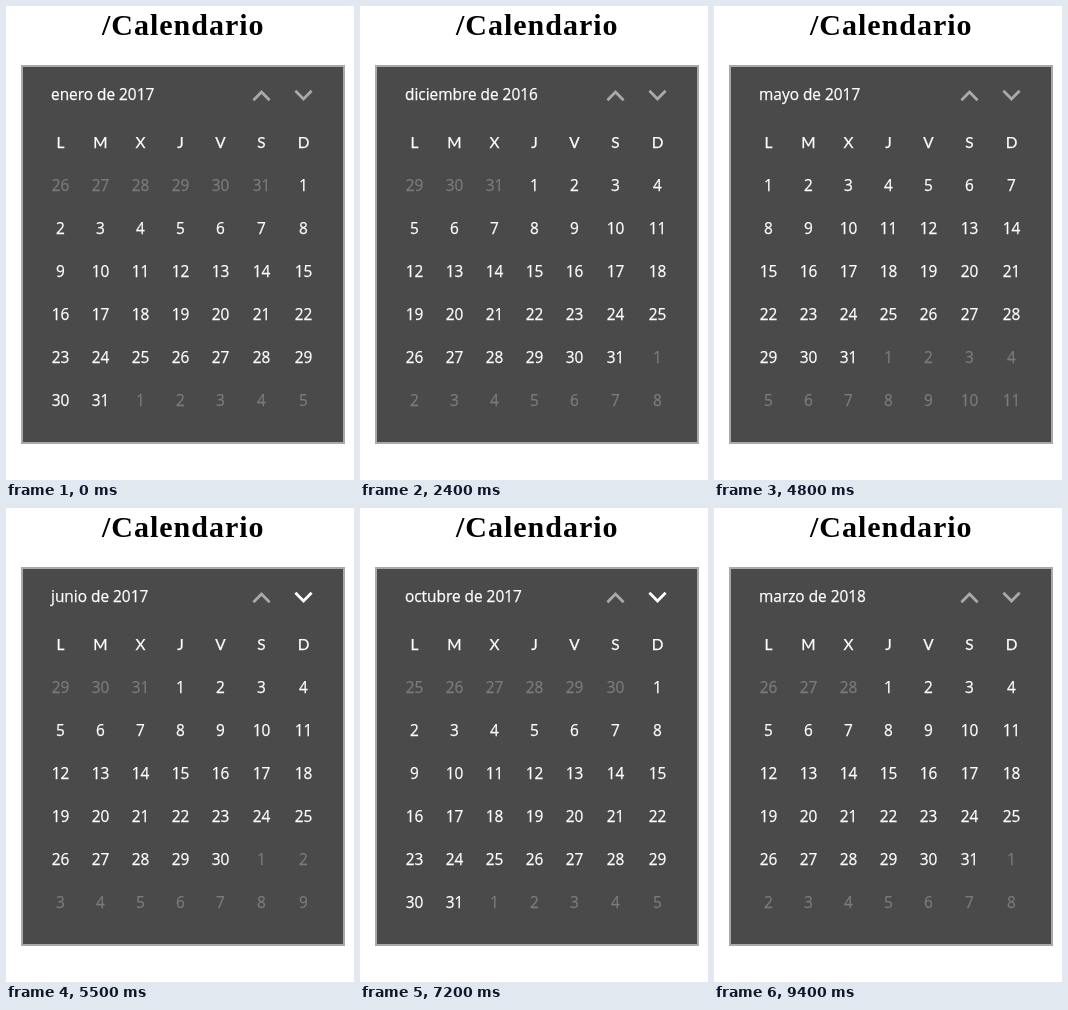
These frames come from a looping animation (348 px wide and 474 px high, 9.9 s). An HTML page:

```html
<!DOCTYPE html>
<html lang="es">
<head>
<meta charset="utf-8">
<title>Calendario</title>
<style>
  html, body { margin: 0; width: 100%; height: 100%; overflow: hidden; background: #fff; }
  svg { display: block; width: 348px; height: 474px; }
  .heading { font: bold 30px "Liberation Serif", "Times New Roman", serif; letter-spacing: 1px; }
  .panel { fill: #4a4a4a; stroke: #a9a9a9; stroke-width: 2; }
  .label { font: 15.4px "Open Sans", "Noto Sans", sans-serif; color: #fff;
    fill: currentColor; stroke: currentColor; stroke-width: .25; }
  .day { font-family: Lato, sans-serif; }
  .mid { text-anchor: middle; }
  .dim { color: #7b7b7b; }
  .arrow { fill: none; stroke: #a9a9a9; stroke-width: 2.8; }
  .arrow.hot { stroke: #fff; }
</style>
</head>
<body>
<svg viewBox="0 0 348 474">
  <text class="heading mid" x="177.3" y="29">/Calendario</text>
  <rect class="panel" x="16" y="60" width="322" height="377"/>
  <text class="label" id="month" x="45" y="94"></text>
  <path class="arrow" id="up" d="M247.4 94.2 L255.5 86.1 L263.6 94.2"/>
  <path class="arrow" id="down" d="M289.4 84.8 L297.5 92.9 L305.6 84.8"/>
  <g id="grid"></g>
</svg>
<script>
const LOOP = 9900;
const COLS = [54.5, 94.5, 134.5, 174.5, 214.5, 255.5, 297.5];
const MONTHS = ['enero', 'febrero', 'marzo', 'abril', 'mayo', 'junio', 'julio',
  'agosto', 'septiembre', 'octubre', 'noviembre', 'diciembre'];

// [start ms, months from January 2017, hovered arrow]
const STEPS = [
  [0, 0], [400, 0, 'up'], [1200, -1], [1700, -1, 'up'], [1900, -2],
  [2100, -2, 'down'], [2400, -1], [2600, -1, 'down'], [2900, 0],
  [3100, 0, 'down'], [3300, 1], [3500, 1, 'down'], [3700, 2],
  [4000, 2, 'down'], [4200, 3], [4600, 3, 'down'], [4800, 4],
  [5100, 4, 'down'], [5200, 5], [5500, 5, 'down'], [5700, 6],
  [6000, 6, 'down'], [6100, 7, 'down'], [6200, 7],
  [6500, 7, 'down'], [6600, 8, 'down'], [6700, 8], [6900, 8, 'down'],
  [7000, 9], [7200, 9, 'down'], [7400, 10], [7500, 10, 'down'], [7800, 11],
  [8300, 11, 'down'], [8500, 12], [8700, 12, 'down'], [8900, 13],
  [9100, 13, 'down'], [9300, 14, 'down'], [9400, 14]
];

const byId = id => document.getElementById(id);
const title = byId('month'), grid = byId('grid');
const arrows = [byId('up'), byId('down')];

function addCell(col, y, type = '') {
  const cell = document.createElementNS('http://www.w3.org/2000/svg', 'text');
  cell.setAttribute('class', `label mid ${type}`);
  cell.setAttribute('x', COLS[col]);
  cell.setAttribute('y', y);
  return grid.appendChild(cell);
}

[...'LMXJVSD'].forEach((day, col) => {
  addCell(col, 142, 'day').textContent = day;
});
const cells = Array.from({ length: 42 }, (_, i) =>
  addCell(i % 7, 185 + 43 * Math.floor(i / 7)));

const daysIn = (year, month) => new Date(year, month + 1, 0).getDate();

function showMonth(offset) {
  const first = new Date(2017, offset, 1);
  const year = first.getFullYear(), month = first.getMonth();
  const lead = (first.getDay() + 6) % 7;
  const days = daysIn(year, month);
  // The calendar counts 31 days before December.
  const before = month === 11 ? 31 : daysIn(year, month - 1);
  title.textContent = `${MONTHS[month]} de ${year}`;
  cells.forEach((cell, i) => {
    const n = i - lead + 1;
    cell.textContent = n < 1 ? before + n : n > days ? n - days : n;
    cell.classList.toggle('dim', n < 1 || n > days);
  });
}

const start = performance.now();
let current;

function draw(now) {
  const t = Math.max(0, now - start) % LOOP;
  const step = STEPS.findLast(s => s[0] <= t);
  if (step !== current) {
    current = step;
    showMonth(step[1]);
    arrows.forEach(a => a.classList.toggle('hot', a.id === step[2]));
  }
  requestAnimationFrame(draw);
}
draw(start);
</script>
</body>
</html>
```
